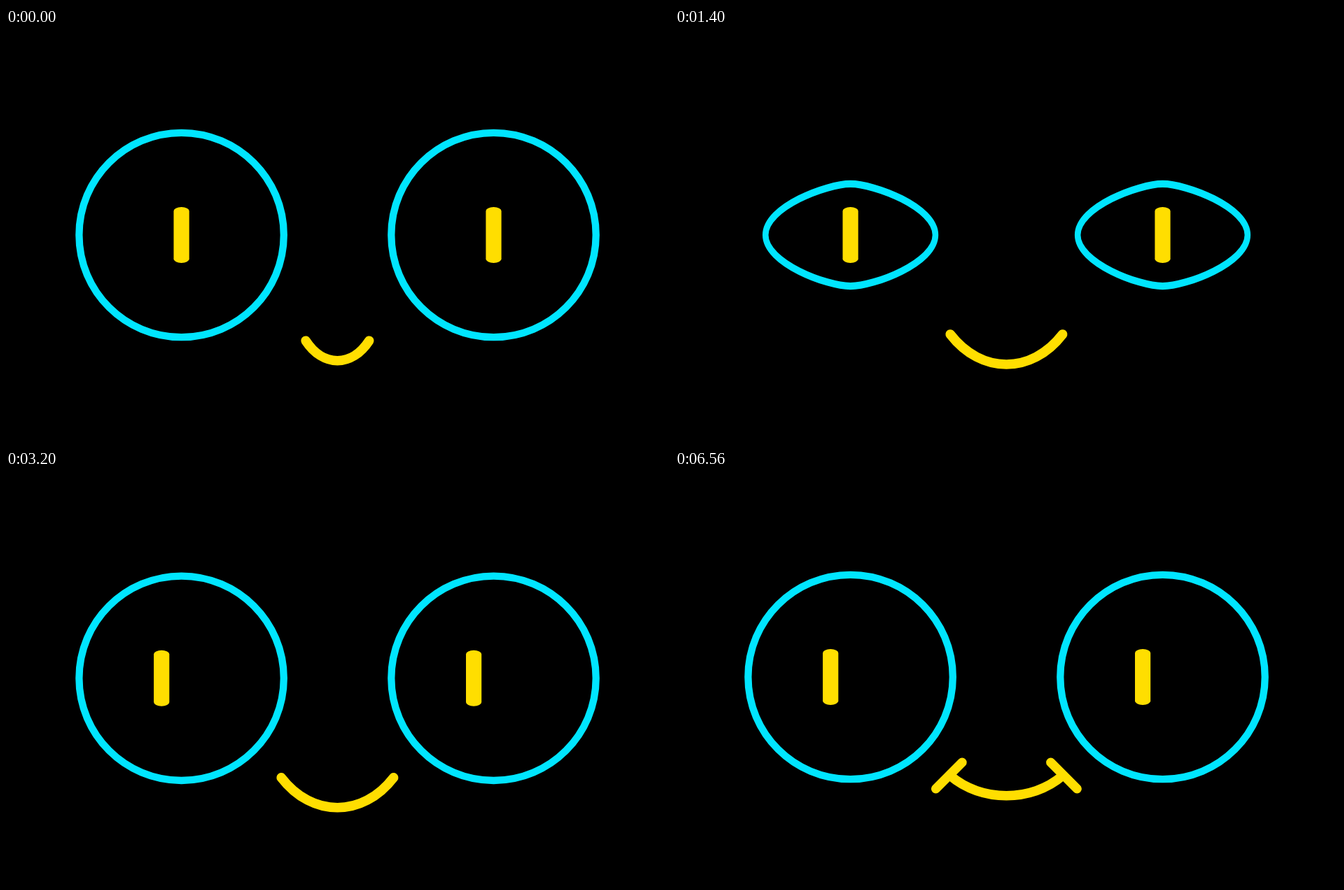
An HTML page with a canvas that plays this animation: 947x592 px, repeating every 8 s.

```html
<!DOCTYPE html>
<html lang="en">
<head>
<meta charset="utf-8">
<title>Robot face</title>
<style>
  html, body { margin: 0; width: 100%; height: 100%; overflow: hidden; background: #000; }
  canvas { display: block; }
</style>
</head>
<body>
<canvas id="stage" width="947" height="592"></canvas>
<script>
const ctx = document.getElementById('stage').getContext('2d');
const CYAN = '#00e5ff', YELLOW = '#ffde00';
const LOOP = 8000, STEP = 40, KAPPA = 0.5523;
const EYE_R = 146.2, EYE_Y = 296, MID_X = 473.4;

// Mouth poses: half width, corner height, depth of the control points
const SMALL = [45.3, 447.2, 38], WIDE = [80.2, 438, 57.3], FLAT = [80.2, 437.2, 38];

const mix = (a, b, p) => a + (b - a) * p;
const mixAll = (a, b, p) => a.map((v, i) => mix(v, b[i], p));
const ramp = (t, start, end) => Math.min(1, Math.max(0, (t - start) / (end - start)));
const smooth = p => p * p * (3 - 2 * p);

// Two quick blinks: 0 is open, 1 is shut
function blinkAt(t) {
  if (t < 1120 || t > 1440) return 0;
  const phase = (t - 1120) % 160 / 80;
  return phase < 1 ? phase : 2 - phase;
}

function lidPath(shut) {
  const r = EYE_R, h = r * (1 - shut), kx = r * KAPPA * (1 - shut), ky = h * KAPPA;
  ctx.beginPath();
  ctx.moveTo(0, -h);
  ctx.bezierCurveTo(kx, -h, r, -ky, r, 0);
  ctx.bezierCurveTo(r, ky, kx, h, 0, h);
  ctx.bezierCurveTo(-kx, h, -r, ky, -r, 0);
  ctx.bezierCurveTo(-r, -ky, -kx, -h, 0, -h);
  ctx.closePath();
}

function drawEye(x, look, shut) {
  const squeeze = 1 - 0.34 * shut;
  ctx.save();
  ctx.translate(x, EYE_Y);

  ctx.save();
  ctx.scale(squeeze, 1);
  lidPath(shut);
  ctx.clip();
  ctx.scale(1 / squeeze, 1);
  ctx.translate(look, 0);
  ctx.fillStyle = YELLOW;
  ctx.beginPath();
  ctx.ellipse(0, -34.3, 11.1, 5.7, 0, Math.PI, 0);
  ctx.ellipse(0, 34.3, 11.1, 5.7, 0, 0, Math.PI);
  ctx.fill();
  ctx.restore();

  ctx.scale(squeeze, 1);
  lidPath(shut);
  ctx.strokeStyle = CYAN;
  ctx.lineWidth = 10.3;
  ctx.stroke();
  ctx.restore();
}

function drawMouth([half, y, depth]) {
  const inner = half * 0.45;
  ctx.strokeStyle = YELLOW;
  ctx.lineWidth = 13.6;
  ctx.beginPath();
  ctx.moveTo(MID_X - half, y);
  ctx.bezierCurveTo(MID_X - inner, y + depth, MID_X + inner, y + depth, MID_X + half, y);
  ctx.stroke();
}

function drawCheeks(size) {
  if (!size) return;
  const d = 18.8 * size;
  ctx.lineWidth = 13.2;
  for (const side of [-1, 1]) {
    const x = MID_X + 82.1 * side;
    ctx.beginPath();
    ctx.moveTo(x - d * side, 437 - d);
    ctx.lineTo(x + d * side, 437 + d);
    ctx.stroke();
  }
}

function draw(t) {
  const look = -28.4 * smooth(ramp(t, 2000, 2520));
  const grin = ramp(t, 6320, 6560);
  const nod = 8.9 * (ramp(t, 3160, 3360) - grin);
  const shut = blinkAt(t);
  const smile = mixAll(SMALL, WIDE, smooth(ramp(t, 280, 680)));

  ctx.fillStyle = '#000';
  ctx.fillRect(0, 0, 947, 592);
  ctx.save();
  ctx.translate(0, nod);
  ctx.lineCap = ctx.lineJoin = 'round';
  drawEye(250.6, look, shut);
  drawEye(696.5, look, shut);
  drawMouth(mixAll(smile, FLAT, grin));
  drawCheeks(smooth(grin));
  ctx.restore();
}

const start = performance.now();
function tick() {
  const t = (performance.now() - start) % LOOP;
  draw(Math.floor(t / STEP) * STEP);
  requestAnimationFrame(tick);
}
tick();
</script>
</body>
</html>
```
